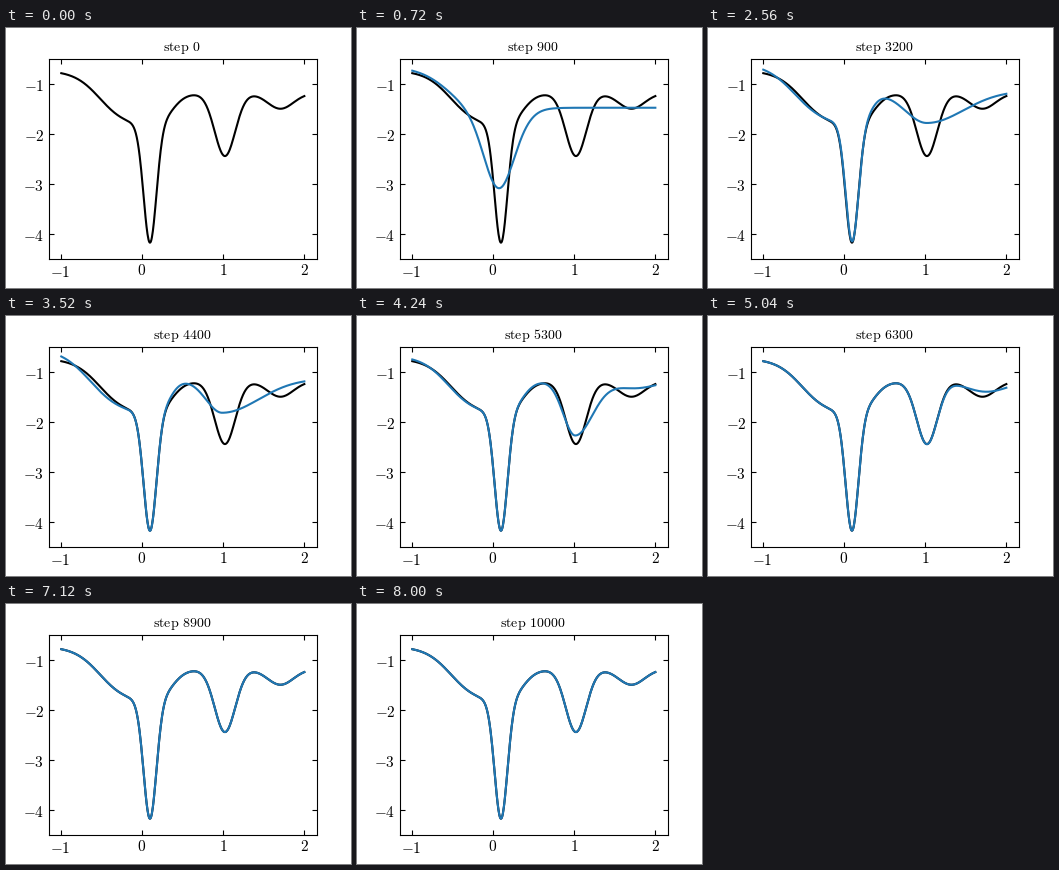
Animation, 345 px wide and 260 px high, one loop 8080 ms. Source, as a matplotlib script:

```python
import numpy as np
import matplotlib.pyplot as plt
from matplotlib.animation import FuncAnimation
from matplotlib.transforms import ScaledTranslation

W, H, DPI = 345, 260, 100
FRAMES, INTERVAL, STEPS_PER_FRAME = 101, 80, 100

plt.rcParams.update({
    "mathtext.fontset": "cm",
    "xtick.direction": "in", "ytick.direction": "in",
    "xtick.top": True, "ytick.right": True,
    "xtick.labelsize": 11, "ytick.labelsize": 11,
    "axes.titlesize": 10,
})

x = np.linspace(-1, 2, 500)


def step_up(height, center, width):
    return height / (1 + np.exp((center - x) / width))


def well(depth, center, left, right):
    """Gaussian dip with its own width on each side."""
    width = np.where(x < center, left, right)
    return -depth * np.exp(-0.5 * ((x - center) / width) ** 2)


def curve(top, fall, rise, deep, second, third):
    return top + step_up(*fall) + step_up(*rise) + well(*deep) + well(*second) + well(*third)


TRUTH = dict(
    top=-0.725,
    fall=np.array([-1.125, -0.521, 0.161]),
    rise=np.array([0.67, 0.371, 0.085]),
    deep=np.array([2.365, 0.095, 0.079, 0.079]),
    second=np.array([1.255, 1.02, 0.127, 0.127]),
    third=np.array([0.31, 1.705, 0.16, 0.16]),
)


def variant(base, **changes):
    return base | {k: np.array(v) for k, v in changes.items()}


# What the fit has learned at a few training steps, latest first.
two_wells = variant(TRUTH, third=[0.21, 1.755, 0.25, 0.25])
shoulder = variant(TRUTH, top=-0.51, fall=[-1.34, -0.64, 0.19], rise=[0.72, 0.35, 0.07],
                   second=[0.68, 0.985, 0.2, 0.45], third=[0, 1.755, 0.25, 0.25])
one_well = variant(shoulder, top=-0.74, fall=[-1.05, -0.515, 0.178], rise=[0.66, 0.295, 0.06],
                   deep=[2.32, 0.102, 0.08, 0.08], second=[0.55, 1.105, 0.46, 0.46])
dip = variant(one_well, top=-0.64, fall=[-1.1, -0.515, 0.2], rise=[0.27, 0.455, 0.1],
              deep=[1.4, 0.066, 0.18, 0.18], second=[0, 1.105, 0.46, 0.46])
flat = variant(dip, top=-1.4, fall=[-0.4, -0.515, 0.3], deep=[0, 0.066, 0.4, 0.4])

STAGES = [(100, flat), (900, dip), (2100, one_well), (4400, shoulder),
          (6300, two_wells), (8100, TRUTH)]


def fit_at(step):
    i = sum(step >= start for start, _ in STAGES[1:-1])
    (s0, a), (s1, b) = STAGES[i:i + 2]
    t = min((step - s0) / (s1 - s0), 1)
    if i:
        t *= 2 - t  # learning slows down within each later stage
    return curve(**{k: a[k] + t * (b[k] - a[k]) for k in a})


fig, ax = plt.subplots(figsize=(W / DPI, H / DPI), dpi=DPI)
fig.subplots_adjust(left=0.125, right=0.9, bottom=0.11, top=0.88)
ax.set(xlim=(-1.15, 2.15), ylim=(-4.5, -0.5))
xs, ys = range(-1, 3), range(-4, 0)
ax.set_xticks(xs, [f"${v}$" for v in xs])
ax.set_yticks(ys, [f"${v}$" for v in ys])
ax.tick_params(axis="x", pad=2.8)


def nudge(text, dx, dy):
    shift = ScaledTranslation(dx / DPI, dy / DPI, fig.dpi_scale_trans)
    text.set_transform(text.get_transform() + shift)


for v, label in zip(xs, ax.get_xticklabels()):
    nudge(label, (v - 2) / 2, -2 if v < 0 else 0)
for label in ax.get_yticklabels():
    nudge(label, 0, -0.8)

ax.plot(x, curve(**TRUTH), color="black", lw=1.5)
fit, = ax.plot([], [], color="C0", lw=1.5)
title = ax.set_title("", x=0.497)


def draw(n):
    step = n * STEPS_PER_FRAME
    title.set_text(rf"$\mathrm{{step}}\hspace{{0.38}}{step}$")
    # the untrained fit lies above the visible range
    fit.set_data(*((x, fit_at(step)) if n else ([], [])))
    return fit, title


anim = FuncAnimation(fig, draw, frames=FRAMES, init_func=lambda: draw(0),
                     interval=INTERVAL, repeat=True, repeat_delay=0)
plt.show()
```
